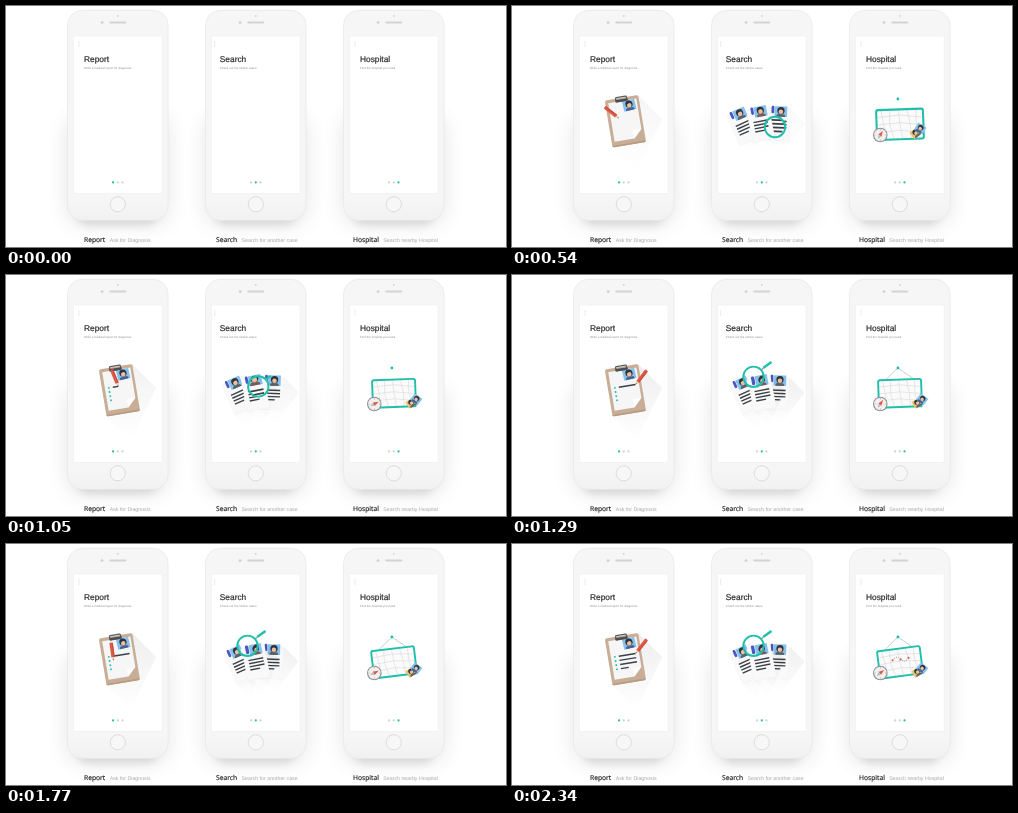
Write an HTML page with a canvas that moves like this. It is 500 px wide and 241 px high and loops after 2.76 s.

```html
<!DOCTYPE html>
<html lang="en">
<head>
<meta charset="utf-8">
<title>Three phone screens</title>
<style>
html, body { margin: 0; width: 100%; height: 100%; overflow: hidden; background: #fff; }
svg, canvas { position: absolute; left: 0; top: 0; width: 500px; height: 241px; }
text { font-family: "Liberation Sans", Arial, sans-serif; text-rendering: geometricPrecision; }
.title { font-size: 8.35px; fill: #2c2c2c; stroke: #2c2c2c; stroke-width: .2px; }
.sub { font-size: 3px; fill: #8d8d8d; }
.name { font: 500 6.7px "Noto Sans", "Open Sans", sans-serif; fill: #222; stroke: #222; stroke-width: .15px; }
.note { font-size: 5.25px; fill: #a8a8a8; }
</style>
</head>
<body>
<svg id="phones" viewBox="0 0 500 241">
  <defs>
    <filter id="wide" x="-60%" y="-60%" width="220%" height="220%"><feGaussianBlur stdDeviation="11"/></filter>
    <filter id="near" x="-40%" y="-40%" width="180%" height="180%"><feGaussianBlur stdDeviation="4"/></filter>
    <linearGradient id="body" x2="0" y2="1">
      <stop offset=".9" stop-color="#f6f6f6"/><stop offset="1" stop-color="#f1f1f1"/>
    </linearGradient>
  </defs>
</svg>
<canvas id="art"></canvas>
<script>
const LOOP = 2760, STEP = 30, LAST = 2340;
const TEAL = '#1fbfa9', RED = '#e05a47', INK = '#3b4046', SKY = '#86c1ee';

// Static phones and labels
const screens = [
  { name: 'Report', sub: 'Write a medical report for diagnosis.', note: 'Ask for Diagnosis', tx: 78, nx: 78 },
  { name: 'Search', sub: 'Check out the similar cases.', note: 'Search for another case', tx: 213.8, nx: 210 },
  { name: 'Hospital', sub: 'Find the hospital you need.', note: 'Search nearby Hospital', tx: 354, nx: 347 }
];
const spot = (x, y, r, fill) => `<circle cx="${x}" cy="${y}" r="${r}" fill="${fill}"/>`;

function phone(s, i) {
  const x = 61.5 + i * 138, mid = x + 50.3;
  return `
    <rect x="${x}" y="110" width="100.6" height="108" rx="14" opacity=".1" filter="url(#wide)"/>
    <rect x="${x + 10}" y="150" width="80" height="69" rx="10" opacity=".1" filter="url(#near)"/>
    <rect x="${x}" y="4.3" width="100.6" height="210.3" rx="15" fill="url(#body)" stroke="#e7e7e7" stroke-width=".7"/>
    <rect x="${x + 6}" y="30" width="88.6" height="157.5" fill="#fff" stroke="#ebebeb" stroke-width=".5"/>
    <rect x="${mid - 8.5}" y="15.6" width="17" height="2" rx="1" fill="#d3d3d3"/>
    ${spot(mid - 15.7, 16.6, 1.4, '#d0d0d0')}${spot(mid, 10, .9, '#d3d3d3')}
    <circle cx="${mid}" cy="198.3" r="7.6" fill="#f7f7f7" stroke="#d9d9d9" stroke-width=".9"/>
    ${[-2, 0, 2].map(d => spot(s.tx - 5, 38 + d, .4, '#aaa')).join('')}
    ${[-1, 0, 1].map(d => spot(mid + d * 4.7, 176.4, 1.1, d === i - 1 ? TEAL : '#cdd2d2')).join('')}
    <text class="title" x="${s.tx}" y="56.2">${s.name}</text>
    <text class="sub" x="${s.tx}" y="63.2">${s.sub}</text>
    <text x="${s.nx}" y="236"><tspan class="name">${s.name}</tspan><tspan class="note" dx="4.4">${s.note}</tspan></text>`;
}
document.getElementById('phones').insertAdjacentHTML('beforeend', screens.map(phone).join(''));

// Canvas helpers
const art = document.getElementById('art'), c = art.getContext('2d');
const dpr = window.devicePixelRatio || 1;
art.width = 500 * dpr;
art.height = 241 * dpr;

const rad = deg => deg * Math.PI / 180;
const mix = (a, b, u) => a + (b - a) * u;
const span = (t, a, b) => Math.max(0, Math.min(1, (t - a) / (b - a)));
const ease = (t, a, b) => { const u = span(t, a, b); return u * u * (3 - 2 * u); };
const pop = (t, a, b) => { const u = span(t, a, b) - 1; return 1 + 2.7 * u ** 3 + 1.7 * u * u; };
const swing = (t, start, decay, pace) => {
  const u = Math.max(0, t - start);
  return Math.exp(-u / decay) * Math.cos(u / pace);
};

function place(x, y, deg, scale, draw) {
  if (scale < .01) return;
  c.save();
  c.translate(x, y);
  c.rotate(rad(deg));
  c.scale(scale, scale);
  draw();
  c.restore();
}
function box(x, y, w, h, fill, r = 0) {
  c.beginPath();
  c.roundRect(x, y, w, h, r);
  c.fillStyle = fill;
  c.fill();
}
function outline(x, y, w, h, color, width, r) {
  c.beginPath();
  c.roundRect(x, y, w, h, r);
  c.strokeStyle = color;
  c.lineWidth = width;
  c.stroke();
}
function disc(x, y, r, fill) {
  c.beginPath();
  c.arc(x, y, r, 0, 7);
  c.fillStyle = fill;
  c.fill();
}
function poly(fill, ...pts) {
  c.beginPath();
  pts.forEach(p => c.lineTo(...p));
  c.closePath();
  c.fillStyle = fill;
  c.fill();
}
function line(color, width, ...pts) {
  c.beginPath();
  pts.forEach(p => c.lineTo(...p));
  c.strokeStyle = color;
  c.lineWidth = width;
  c.stroke();
}
// A sheet's long shadow, always falling to the lower right
function cast(w, h, deg, len, alpha) {
  const a = rad(deg), px = w / 2 * Math.cos(a) + h / 2 * Math.sin(a), py = w / 2 * Math.sin(a) - h / 2 * Math.cos(a);
  const fade = c.createLinearGradient(px, py, -px + len, -py + len);
  fade.addColorStop(0, `rgba(0,0,0,${alpha})`);
  fade.addColorStop(1, 'rgba(0,0,0,0)');
  poly(fade, [px, py], [px + len, py + len], [len - px, len - py], [-px, -py]);
}
function portrait(x, y, size, deg = 0, back = SKY, coat = '#45618f') {
  place(x, y, deg, size / 12, () => {
    box(-6, -5, 12, 10, back);
    disc(0, -1, 3.5, '#2e3440');
    disc(0, .2, 2.2, '#eebf9d');
    box(-4.2, 2.5, 8.4, 2.5, coat, [2, 2, 0, 0]);
  });
}

// Report: clipboard with lines written one after another
const rows = [0, 1, 2, 3].map(i => {
  const from = i ? 1580 + i * 190 : 900;
  return { y: i * 4.2 - 4, from, to: from + (i ? 150 : 390), w: i < 3 ? 17 : 8 };
});
const stops = rows.flatMap(r => [[r.from, -6, r.y], [r.to, r.w - 6, r.y]]);

function pencilAt(t) {
  const next = Math.max(1, stops.findIndex(s => s[0] >= t));
  const [a, b] = [stops[next - 1], stops[next]];
  const u = ease(t, a[0], b[0]);
  return [mix(a[1], b[1], u), mix(a[2], b[2], u)];
}
function pencil() {
  poly('#f0cfaa', [0, 0], [-1.7, -3.6], [1.7, -3.6]);
  poly(INK, [0, 0], [-.6, -1.3], [.6, -1.3]);
  box(-1.7, -18, 3.4, 14.5, RED, [1, 1, 0, 0]);
  box(.5, -17.5, 1.2, 14, '#c94c3d');
}
function report(t) {
  const tilt = -9.5;
  place(113.4, 115.2, 0, pop(t, 30, 450), () => {
    cast(34, 47.5, tilt, 24, mix(.035, .065, ease(t, 870, 1200)));
    c.rotate(rad(tilt));
    box(-17, -23.7, 34, 47.5, '#c8ae96', 2);
    box(-17, 22.2, 34, 1.6, '#b79c83', [0, 0, 2, 2]);
    poly('#f6f6f6', [-14, -20.5], [14.5, -20.5], [14.5, 10], [6, 18.5], [-14, 18.5]);
    poly('#fff', [14.5, 10], [6, 10.5], [6, 18.5]);
    rows.forEach((r, i) => {
      const dot = span(t, 570 + i * 60, 660 + i * 60);
      if (dot) disc(-10, r.y, .95 * dot, TEAL);
      box(-6, r.y - .7, r.w * ease(t, r.from, r.to), 1.4, INK);
    });
    portrait(6.4, -15.2, 12.5 * pop(t, 180, 360), -4);
    outline(-6, -24.8, 11, 4.4, '#565b60', 1.2, 1);
    box(-6.5, -22.4, 12.4, 2.4, '#4a4f54', .6);
    const [x, y] = pencilAt(t);
    const lean = mix(-8, 38, (x + 6) / 17) - 44 * (1 - ease(t, 900, 1290));
    place(x, y, lean - tilt, pop(t, 120, 330), pencil);
  });
}

// Search: fanned sheets under a magnifier
function docs(t) {
  const closed = ease(t, 900, 1230);
  [-1, 1, 0].forEach((k, i) => {
    const u = pop(t, 30 + i * 45, 360 + i * 45), deg = (13 * k - 11) * u;
    const x = 249 + closed + mix(17.5, 15.5, closed) * k * u;
    place(x, 118.5 + k * k * (1 - k), 0, u, () => {
      cast(23, 33, deg, 15, .02 + .04 * closed);
      c.rotate(rad(deg));
      box(-11.5, -16.5, 23, 33, '#f0f0f0');
      box(-11.3, -16.3, 22.5, 32.4, '#f9f9f9');
      for (let n = 0; n < 4; n++) box(-7, n * 3.2 - 4, n < 3 ? 15 : 10, 1.4, INK);
      portrait(2, -13, 12.5, 0, SKY, k ? '#59616a' : '#7d5a50');
      box(-7.5, -18.5, 2.8, 7.5, '#4a58c4', 1.3);
    });
  });
}
function search(t) {
  docs(t);
  const move = ease(t, 870, 1230);
  const x = mix(263, 241.5, move), y = mix(121, 101.8, move);
  place(x, y, 0, pop(t, 150, 390), () => {
    if (move) {
      line('#8fa3a8', 1.4, [7, -6.3], [7 + 4 * move, -6.3 - 3.5 * move]);
      line(TEAL, 2.4, [7 + 3 * move, -6.3 - 2.7 * move], [7 + 11 * move, -6.3 - 8.5 * move]);
    }
    disc(0, 0, 10.2, '#fff');
    c.save();
    c.beginPath();
    c.arc(0, 0, 10, 0, 7);
    c.clip();
    c.scale(1.18, 1.18);
    c.translate(-x, -y);
    docs(t);
    c.restore();
    outline(-10.2, -10.2, 20.4, 20.4, TEAL, 1.9, 10.2);
  });
}

// Hospital: hanging map, compass and photo cards
function map(t) {
  box(-21.5, -13.7, 43, 27.4, '#fbfbfb', 1.8);
  for (let i = -2; i <= 2; i++) line('#dedede', .7, [i * 8 - 1, -13], [i * 8 + 1.5 * Math.sin(i * 2), 0], [i * 8 + 2, 13]);
  for (let i = -1; i <= 1; i++) line('#dedede', .7, [-21, i * 7], [0, i * 7 - 1.5], [21, i * 7 + 1]);
  outline(-21.5, -13.7, 43, 27.4, TEAL, 1.9, 1.8);
  for (let i = 0; i < 9; i++) {
    const u = span(t, 1980 + i * 36, 2050 + i * 36), stop = i % 4 === 0;
    if (u) disc(i * 2 - 7, -3 - 2.5 * Math.sin(i * .8), (stop ? 1.1 : .4) * u, stop ? RED : INK);
  }
}
function hospital(t) {
  const pin = [385.9, 93], hub = [388, 118.3];
  const deg = -2 - 5.5 * (1 - swing(t, 1650, 180, 90));
  const hang = ease(t, 1080, 1290), a = rad(deg);
  if (hang) [-14, 14].forEach(x => {
    const end = [hub[0] + x * Math.cos(a) + 14 * Math.sin(a), hub[1] + x * Math.sin(a) - 14 * Math.cos(a)];
    line('#8fb5b0', .6, pin, end.map((v, k) => mix(pin[k], v, hang)));
  });
  place(...hub, deg, pop(t, 300, 660), () => map(t));
  place(...pin, 0, pop(t, 150, 300), () => disc(0, 0, 1.4, TEAL));

  const fly = ease(t, 390, 600);
  place(mix(399, 408, fly), mix(119, 126, fly), 30 * (fly - 1), pop(t, 390, 570), () => {
    portrait(-2.5, 2, 9.5, -32, '#e8c26a', '#59616a');
    portrait(2.2, -1.8, 9.5, 38);
  });

  place(368.3, 129, 0, pop(t, 60, 330), () => {
    disc(0, 0, 7.3, '#8d9297');
    disc(0, 0, 6.2, '#f1f0ee');
    for (let i = 0; i < 4; i++) place(0, 0, i * 90, 1, () => box(-.35, -5.7, .7, 1.3, '#9aa0a5'));
    c.rotate(rad(55 - 150 * swing(t, 330, 500, 160)));
    poly(RED, [0, -5], [1.9, .6], [-1.9, .6]);
    poly('#b6bbc0', [0, 4.6], [1.6, .6], [-1.6, .6]);
  });
}

const start = performance.now();
function frame() {
  const now = (performance.now() - start) % LOOP;
  const t = Math.min(LAST, Math.floor(now / STEP) * STEP);
  c.setTransform(dpr, 0, 0, dpr, 0, 0);
  c.clearRect(0, 0, 500, 241);
  report(t);
  search(t);
  hospital(t);
  requestAnimationFrame(frame);
}
frame();
</script>
</body>
</html>
```
